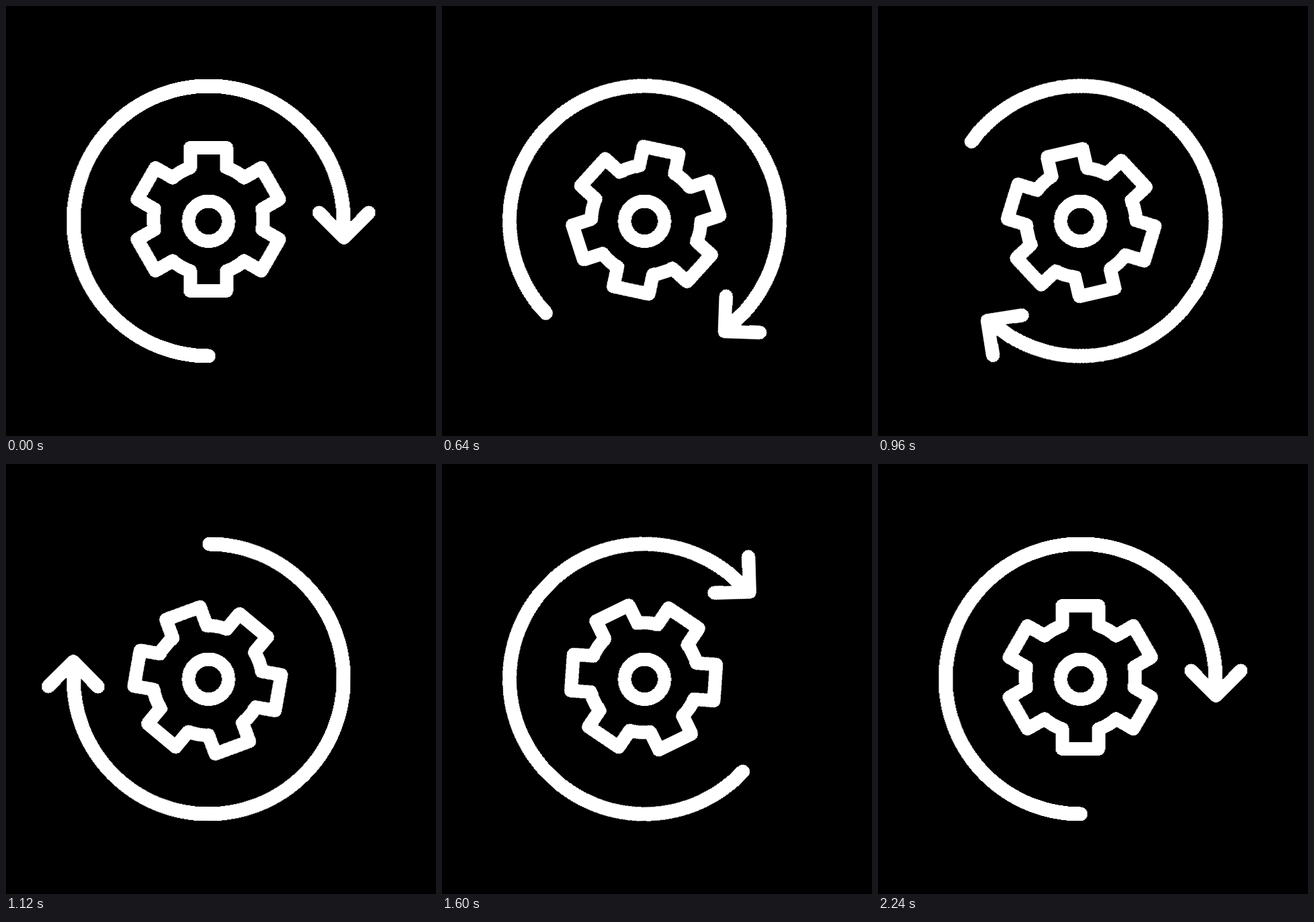
Write an HTML page that moves like this. It is 640 px wide and 640 px high and loops after 2280 ms.

```html
<!DOCTYPE html>
<html lang="en">
<head>
<meta charset="utf-8">
<title>Turning gear</title>
<style>
  html, body {
    margin: 0;
    width: 100%;
    height: 100%;
    overflow: hidden;
    background: #000;
  }
  svg {
    display: block;
    width: 100%;
    height: 100%;
  }
  .icon {
    fill: none;
    stroke: #fff;
    stroke-width: 20;
    stroke-linecap: round;
    stroke-linejoin: round;
    shape-rendering: crispEdges;
  }
  .arrow, .gear {
    transform-origin: 0 0;
    animation: 2280ms infinite;
  }
  .arrow { animation-name: arrow-turn; }
  .gear { animation-name: gear-turn; }

  /* The arrow turns for 2240 ms, the gear for 2000 ms; both then rest. */
  @keyframes arrow-turn {
    0% {
      transform: rotate(0deg);
      animation-timing-function: cubic-bezier(.541, 0, .459, 1);
    }
    98.2456%, 100% { transform: rotate(360deg); }
  }
  @keyframes gear-turn {
    0% {
      transform: rotate(0deg);
      animation-timing-function: cubic-bezier(.46, 0, .54, 1);
    }
    87.7193%, 100% { transform: rotate(360deg); }
  }
</style>
</head>
<body>
<svg viewBox="0 0 640 640">
  <defs>
    <path id="tooth" d="M-27 -77V-106.5H27V-77A81.6 81.6 0 0 1 53.18 -61.88"/>
  </defs>
  <g class="icon" transform="translate(301.5 320)">
    <g class="arrow">
      <path stroke-width="21" d="M0 201A201 201 0 1 1 201 0L201.5 22"/>
      <path d="M164.5 -12.5L201.5 25L238.5 -12.5"/>
    </g>
    <g class="gear">
      <g transform="translate(-.3 -2.5)">
        <use href="#tooth"/>
        <use href="#tooth" transform="rotate(60)"/>
        <use href="#tooth" transform="rotate(120)"/>
        <use href="#tooth" transform="rotate(180)"/>
        <use href="#tooth" transform="rotate(240)"/>
        <use href="#tooth" transform="rotate(300)"/>
      </g>
    </g>
    <circle cy=".3" r="29.75"/>
  </g>
</svg>
</body>
</html>
```
